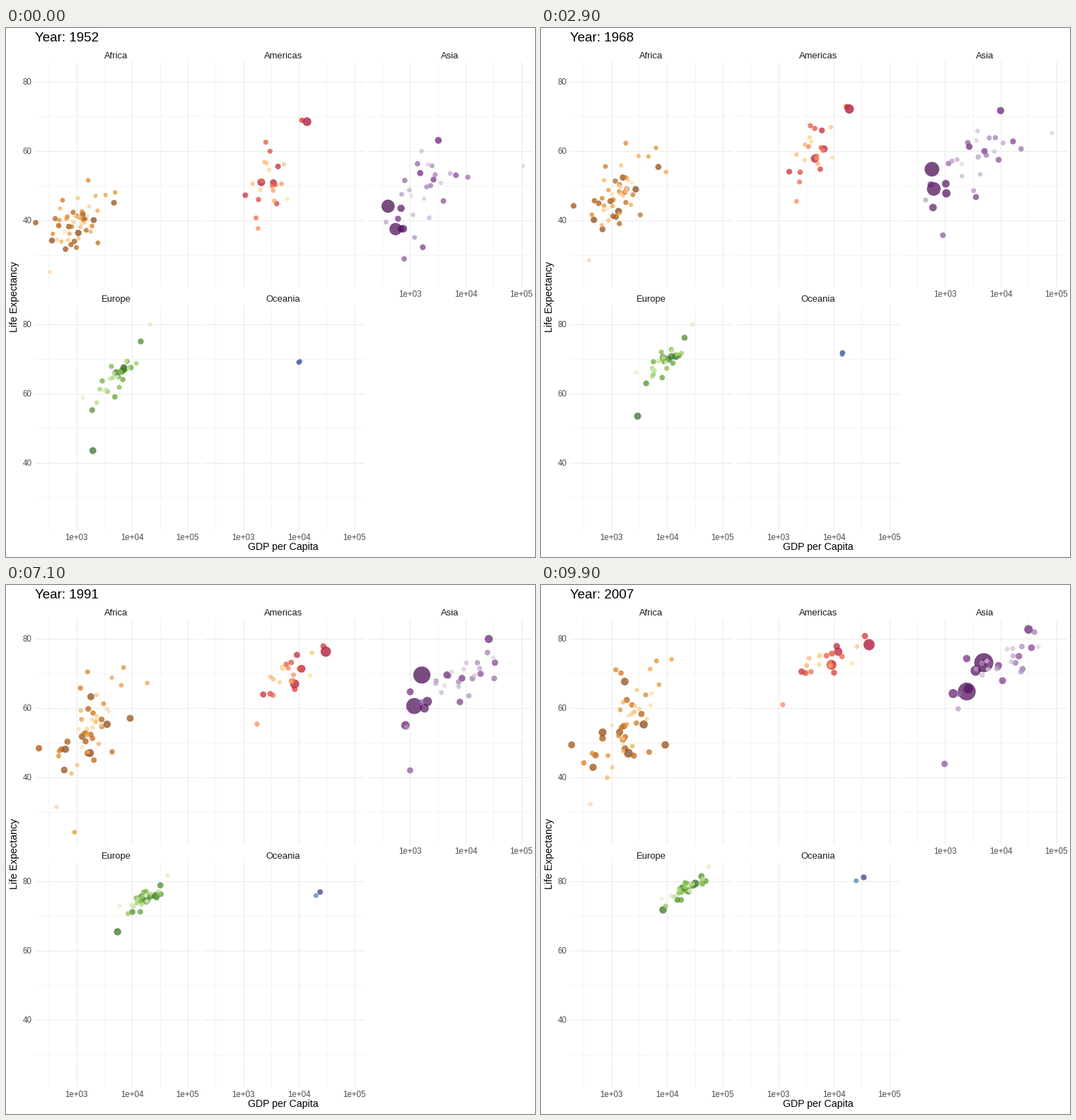
A matplotlib script that plays this animation: 748x748 px, repeating every 10000 ms.

```python
import numpy as np
import matplotlib.pyplot as plt
from matplotlib.animation import FuncAnimation

SIZE, DPI, FRAMES = 748, 72, 100
FIRST, LAST = 1952, 2007
KNOTS = np.array([FIRST, 1982, LAST])
DECADE, PER_YEAR = 78.55, 4.9      # pixels per x decade, per year of life
COLS, ROWS = (99.7, 335.6, 571.5), (75.6, 419.2)
GRID, TICK = "#ebebeb", "#4d4d4d"

plt.rcParams["font.family"] = "Liberation Sans"
rng = np.random.default_rng(7)
fig = plt.figure(figsize=(SIZE / DPI, SIZE / DPI), dpi=DPI, facecolor="white")
ax = fig.add_axes([0, 0, 1, 1])
ax.set(xlim=(0, SIZE), ylim=(SIZE, 0))
ax.axis("off")


def label(x, y, text, size, color="black", **kw):
    kw = {"ha": "center", "va": "baseline", **kw}
    return ax.text(x, y, text, fontsize=size, color=color, **kw)


def ramp(stops, n):
    rgb = np.array([plt.matplotlib.colors.to_rgb("#" + s) for s in stops.split()])
    t = np.linspace(0, len(rgb) - 1, n)
    return np.stack([np.interp(t, range(len(rgb)), c) for c in rgb.T], axis=1)


def panel(name, col, row):
    x3, y80 = COLS[col], ROWS[row]
    left, right = x3 - 59, x3 + 171.8
    top, bottom = y80 - 27.4, y80 + 290.5
    for i in range(6):
        x = x3 + (i - 1) * DECADE / 2
        y = y80 + i * 10 * PER_YEAR
        wide_x, wide_y = (1.02, 0.5) if i % 2 else (0.5, 1.02)
        ax.plot([x, x], [top, bottom], color=GRID, lw=wide_x, zorder=wide_x)
        ax.plot([left, right], [y, y], color=GRID, lw=wide_y, zorder=wide_y)
    label((left + right) / 2, y80 - 32.5, name, 13, "#1a1a1a")
    for i in range(3):
        if col == 0:
            label(36.3, y80 + i * 20 * PER_YEAR + 4.1, 80 - 20 * i, 11.5, TICK,
                  ha="right")
        if row == 1 or col == 2:
            label(x3 + i * DECADE, bottom + 13.9, f"1e+0{i + 3}", 11.5, TICK)


def spread(n):
    """Shuffled, evenly ranked values close to a standard normal."""
    p = (rng.permutation(n) + 0.5) / n
    return np.log(p / (1 - p)) / 1.75


def cloud(n, stats):
    """Correlated gdp and life scatter whose ranks drift from knot to knot."""
    gdp, life, gdp2, life2 = (spread(n) for _ in range(4))
    out = []
    for k, (gm, gs, lm, ls, corr) in enumerate(stats):
        c, s = np.cos(0.3 * k), np.sin(0.3 * k)
        zg, zl = c * gdp + s * gdp2, c * life + s * life2
        mix = corr * zg + np.sqrt(1 - corr ** 2) * zl
        out.append(np.stack([gm + gs * zg, lm + ls * mix], axis=1))
    return np.array(out)


curves, places, pops, growths, colors, kinks = [], [], [], [], [], []


def region(name, col, row, n, stops, growth, heads, base, decay,
           stats=(), tracks=(), bends=()):
    """Dots go from largest to smallest population. Each track is a rank and
    gdp, life at the three knots; each bend is rank, year, reach, gdp, life."""
    panel(name, col, row)
    knots = cloud(n, stats) if stats else np.zeros((3, n, 2))
    for rank, *values in tracks:
        pairs = np.reshape(values, (3, 2)).astype(float)
        pairs[:, 0] = np.log10(pairs[:, 0])
        knots[:, rank] = pairs
    offset = sum(map(len, pops))
    kinks.extend((offset + rank, *rest) for rank, *rest in bends)
    pop = base * np.exp(-decay * np.arange(n))
    pop[:len(heads)] = heads
    curves.append(knots)
    places.append(np.tile([COLS[col], ROWS[row]], (n, 1)))
    pops.append(pop)
    growths.append(np.full(n, growth))
    colors.append(ramp(stops, n))


region("Africa", 0, 0, 52, "7f3b08 b35806 e08214 fdb863 fee0b6",
       0.025, [135], 110, 0.11,
       stats=[(2.98, 0.27, 39, 4.5, 0.4),
              (3.17, 0.31, 51.6, 7, 0.6),
              (3.24, 0.38, 54.8, 8.6, 0.6)],
       tracks=[(0, 1077, 36.3, 1577, 45.8, 2014, 46.9),
               (2, 362, 34.1, 578, 44.9, 691, 52.9),
               (4, 4725, 45, 8568, 58.2, 9270, 49.3),
               (28, 493, 40, 882, 46.2, 863, 46.2),
               (32, 2388, 42.7, 17364, 62.2, 12057, 74)],
       bends=[(28, 1992, 10, 0, -24)])

region("Americas", 1, 0, 25, "a50026 d73027 f46d43 fdae61 fee090",
       0.016, [301, 190, 109], 60, 0.15,
       stats=[(3.48, 0.2, 52, 8.5, 0.45),
              (3.75, 0.2, 66.5, 5.5, 0.65),
              (3.89, 0.23, 73.6, 2.8, 0.6)],
       tracks=[(0, 13990, 68.4, 25010, 74.7, 42952, 78.2),
               (1, 2109, 50.9, 7031, 63.3, 9066, 72.4),
               (2, 3478, 50.8, 9611, 67.4, 11978, 76.2),
               (5, 11367, 68.8, 22899, 75.8, 36319, 80.7),
               (14, 1840, 37.6, 2011, 51.5, 1202, 60.9)])

region("Asia", 2, 0, 33, "40004b 762a83 9970ab c2a5cf e7d4e8",
       0.018, [1319, 1110, 224, 169, 150, 127], 170, 0.13,
       stats=[(3.25, 0.33, 50, 8.5, 0.5),
              (3.76, 0.42, 65, 5.5, 0.7),
              (3.97, 0.43, 72.8, 5, 0.8)],
       tracks=[(0, 400, 44, 962, 65.5, 4959, 73),
               (1, 547, 37.4, 856, 56.6, 2452, 64.7),
               (2, 750, 37.5, 1517, 56.2, 3541, 70.7),
               (3, 685, 43.4, 1443, 56.2, 2606, 65.5),
               (4, 684, 37.5, 677, 50, 1391, 64.1),
               (5, 3217, 63, 19384, 77.1, 31656, 82.6),
               (7, 605, 40.4, 707, 58.8, 2442, 74.2),
               (12, 779, 28.8, 978, 39.9, 975, 43.8),
               (22, 368, 39.4, 624, 51, 1714, 59.7),
               (31, 108382, 55.6, 31354, 71.3, 47307, 77.6)],
       bends=[(0, 1962, 9, 0.06, -8), (22, 1977, 5, 0, -18),
              (31, 1972, 15, 0.37, 0)])

region("Europe", 0, 1, 30, "276419 4d9221 7fbc41 b8e186 e6f5d0",
       0.006, [82, 71, 61, 61, 58], 60, 0.14,
       stats=[(3.72, 0.26, 65.2, 4.6, 0.85),
              (4.13, 0.2, 73, 2.4, 0.75),
              (4.36, 0.21, 78, 2.3, 0.87)],
       tracks=[(0, 7144, 67.5, 22032, 73.8, 32170, 79.4),
               (1, 1969, 43.6, 4241, 61, 8458, 71.8)])

region("Oceania", 1, 1, 2, "313695 4575b4", 0.015, [], 20.4, 1.6,
       tracks=[(0, 10040, 69.1, 19477, 74.7, 34435, 81.2),
               (1, 10557, 69.4, 17632, 73.8, 25185, 80.2)])

knots = np.concatenate(curves, axis=1)
place = np.concatenate(places)
pop = np.concatenate(pops)
growth = np.concatenate(growths)


def state(year):
    """Pixel positions and marker areas in a (fractional) year."""
    pos = np.zeros_like(knots[0])
    for k, here in enumerate(KNOTS):
        others = np.delete(KNOTS, k)
        pos += knots[k] * np.prod((year - others) / (here - others))
    for dot, when, reach, gdp, life in kinks:
        pos[dot] += max(0, 1 - abs(year - when) / reach) * np.array([gdp, life])
    xy = place + (pos - [3, 80]) * [DECADE, -PER_YEAR]
    people = np.clip(pop * np.exp(growth * (year - LAST)) - 0.06, 0, None)
    mm = 2 + 10 * np.sqrt(people / pop.max())
    return xy, (0.75 * (2.845 * mm + 0.945) + 0.7) ** 2


label(392, 738, "GDP per Capita", 14.1)
label(15.8, 379.5, "Life Expectancy", 14.1, rotation=90, rotation_mode="anchor")
title = label(40.8, 19, "", 18.7, ha="left")
xy, area = state(FIRST)
dots = ax.scatter(*xy.T, s=area, c=np.concatenate(colors),
                  alpha=0.7, linewidths=0, zorder=3)


def update(i):
    year = FIRST + (LAST - FIRST) * i / (FRAMES - 1)
    xy, area = state(year)
    dots.set_offsets(xy)
    dots.set_sizes(area)
    title.set_text(f"Year: {round(year)}")
    return dots, title


anim = FuncAnimation(fig, update, frames=FRAMES, interval=100, repeat=True)
plt.show()
```
